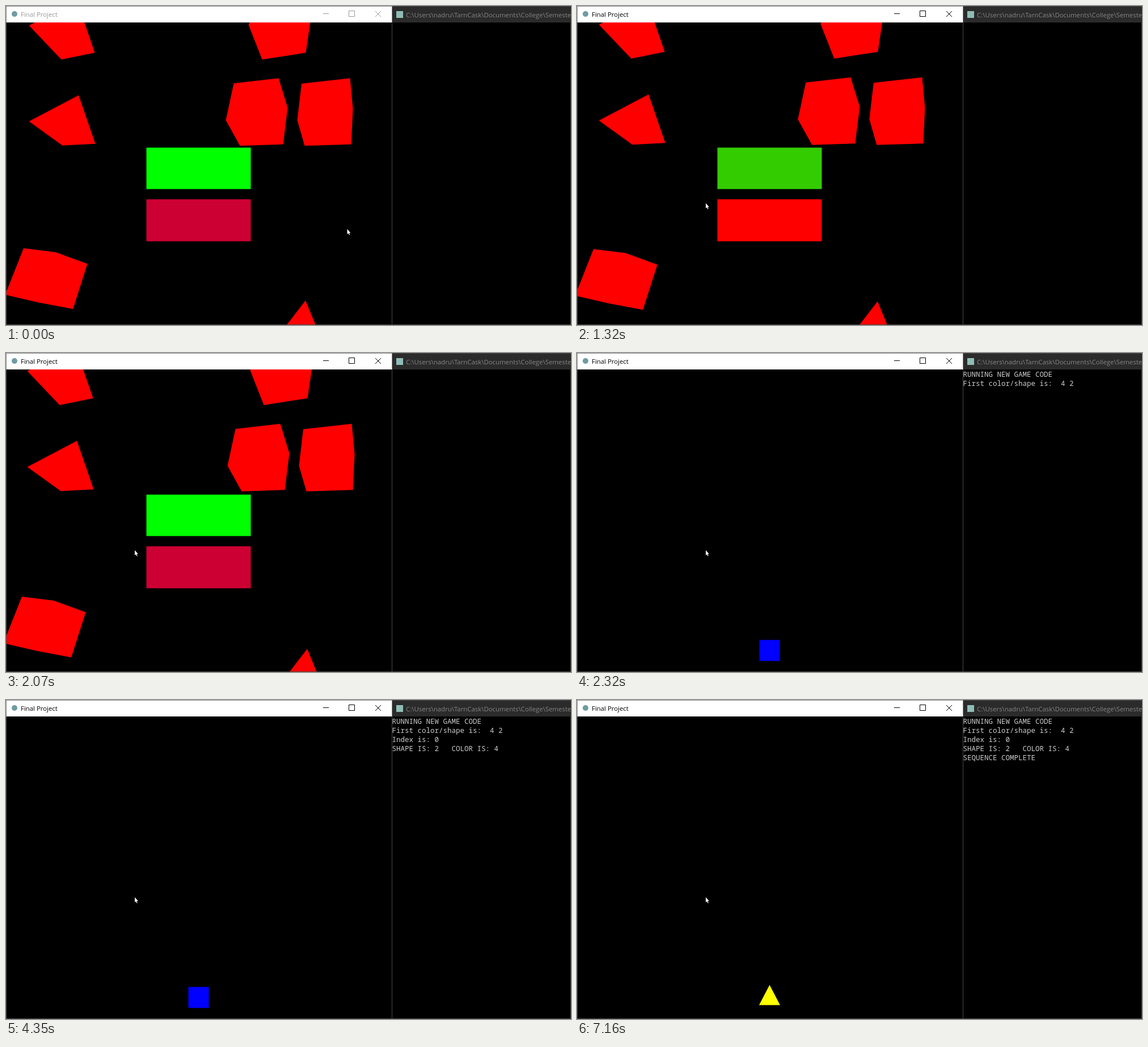
An HTML page for the animation above (8000 ms loop, 996 px wide and 562 px high).

```html
<!DOCTYPE html>
<html>
<head>
<meta charset="utf-8">
<style>
  html, body { margin: 0; width: 100%; height: 100%; overflow: hidden; background: #000; }
  svg { display: block; width: 100%; height: 100%; }
  .title { font: 11.4px "Open Sans", sans-serif; }
  .console { font: 12.5px "Noto Sans Mono", monospace; fill: #ccc; white-space: pre; }
</style>
</head>
<body>
<svg viewBox="0 0 996 562">
  <clipPath id="view"><rect x="1" y="29" width="679" height="532"/></clipPath>
  <rect width="996" height="562"/>

  <g clip-path="url(#view)">
    <g id="menu">
      <g id="rocks" fill="#f00">
        <path data-side="-1 -1" d="M39 33L96 93L155 81L134 20L57 24ZM39 202L126.500 156L156 241.500L98 244.500Z"/>
        <path data-side="1 -1" d="M429 32L453 93L530 81L539 20H434Z
          M403 135L482 126L498 178L490 242.500L414 245L389 200Z
          M522.500 135.500L608 126L613 180L610 242.500L528 245L515 200Z"/>
        <path data-side="-1 1" d="M29.500 428L86 435L142 455.500L116.500 535L55.500 523.500L-3 510Z"/>
        <path data-side="1 1" d="M529.500 520L491 570H550Z"/>
      </g>
      <rect id="start" x="247.500" y="249.500" width="184" height="73"/>
      <rect id="quit" x="247.500" y="340.500" width="184" height="74"/>
    </g>
    <g id="pyramid">
      <path d="M340 295.500L285.500 377L306.500 401.500Z" fill="#cc0"/>
      <path d="M340 295.500L306.500 401.500L398.500 394Z" fill="#ff0"/>
    </g>
    <path id="picker"/>
  </g>

  <path d="M.5 29V562M0 561.500H996M680.500 29V562M995.500 29V562" stroke="#4a4a4a"/>

  <rect width="681" height="29" fill="#888"/>
  <rect x="1" y="1" width="679" height="28" fill="#fff"/>
  <circle cx="15" cy="14" r="5" fill="#6f9ba3"/>
  <g id="chrome">
    <text class="title" x="26" y="19" fill="currentColor">Final Project</text>
    <path fill="none" stroke="currentColor" d="M559 13.500h10M604.500 8.500h10v10h-10zM651 9l10 10M661 9l-10 10"/>
  </g>

  <rect x="681" width="315" height="29" fill="#2b2b2b"/>
  <path d="M681 .5H996" stroke="#4a4a4a"/>
  <rect x="688" y="9" width="12" height="12" fill="#8fbdb5"/>
  <text class="title" x="705" y="20" fill="#858585">C:\Users\nadru\TarnCask\Documents\College\Semeste</text>

  <path id="cursor" d="M0 0V9L2 7.300L3.500 10.500L4.700 9.900L3.400 6.700H6Z" fill="#fff"/>
</svg>
<script>
const LOOP = 8000;
const TICK = 258;
const DRIFT_TICKS = 8;
const GAME_START = 2320;

const LINES = [
  [GAME_START, "RUNNING NEW GAME CODE"],
  [GAME_START, "First color/shape is:  4 2"],
  [2560, "Index is: 0"],
  [2560, "SHAPE IS: 2   COLOR IS: 4"],
  [4540, "SEQUENCE COMPLETE"]
];

const SQUARE = "M321.5 505.5h36v37h-36Z";
const TRIANGLE = "M339.5 502L358 537.5H321Z";
const BALL = "M316.5 524a23 24.5 0 1 0 46 0a23 24.5 0 1 0 -46 0Z";

const $ = id => document.getElementById(id);
const set = (el, name, value) => el.setAttribute(name, value);
const show = (el, on) => set(el, "visibility", on ? "visible" : "hidden");

const rows = LINES.map(([, text], i) => {
  const row = document.createElementNS("http://www.w3.org/2000/svg", "text");
  set(row, "class", "console");
  set(row, "x", 680.5);
  set(row, "y", 42 + 16 * i);
  row.textContent = text;
  return document.querySelector("svg").appendChild(row);
});

// Rocks spread away from the middle of the window in even steps.
function drawRocks(t) {
  const spread = Math.min(Math.floor(t / TICK) / DRIFT_TICKS, 1) - 0.5;
  for (const rock of $("rocks").children) {
    const [sx, sy] = rock.dataset.side.split(" ");
    set(rock, "transform", `translate(${3 * sx * spread} ${2.5 * sy * spread})`);
  }
}

function pickerShape(t) {
  if (t < GAME_START) return "";
  if (t < 5580) return SQUARE;
  return t >= 6020 && t < 6730 ? BALL : TRIANGLE;
}

function draw(t) {
  const focused = t >= 540;
  const quitChosen = t >= 1090 && t < 1810;

  set($("chrome"), "color", focused ? "#000" : "#999");
  set($("cursor"), "transform", focused ? "translate(227 347.5)" : "translate(601.5 393)");

  show($("menu"), t < GAME_START);
  drawRocks(t);
  set($("start"), "fill", quitChosen ? "#3c0" : "#0f0");
  set($("quit"), "fill", quitChosen ? "#f00" : "#c03");

  show($("pyramid"), t >= 2560 && t < 4350);
  set($("picker"), "d", pickerShape(t));
  set($("picker"), "fill", t < 7160 ? "#00f" : "#ff0");
  rows.forEach((row, i) => show(row, t >= LINES[i][0]));
}

function frame() {
  draw(performance.now() % LOOP);
  requestAnimationFrame(frame);
}
frame();
</script>
</body>
</html>
```
